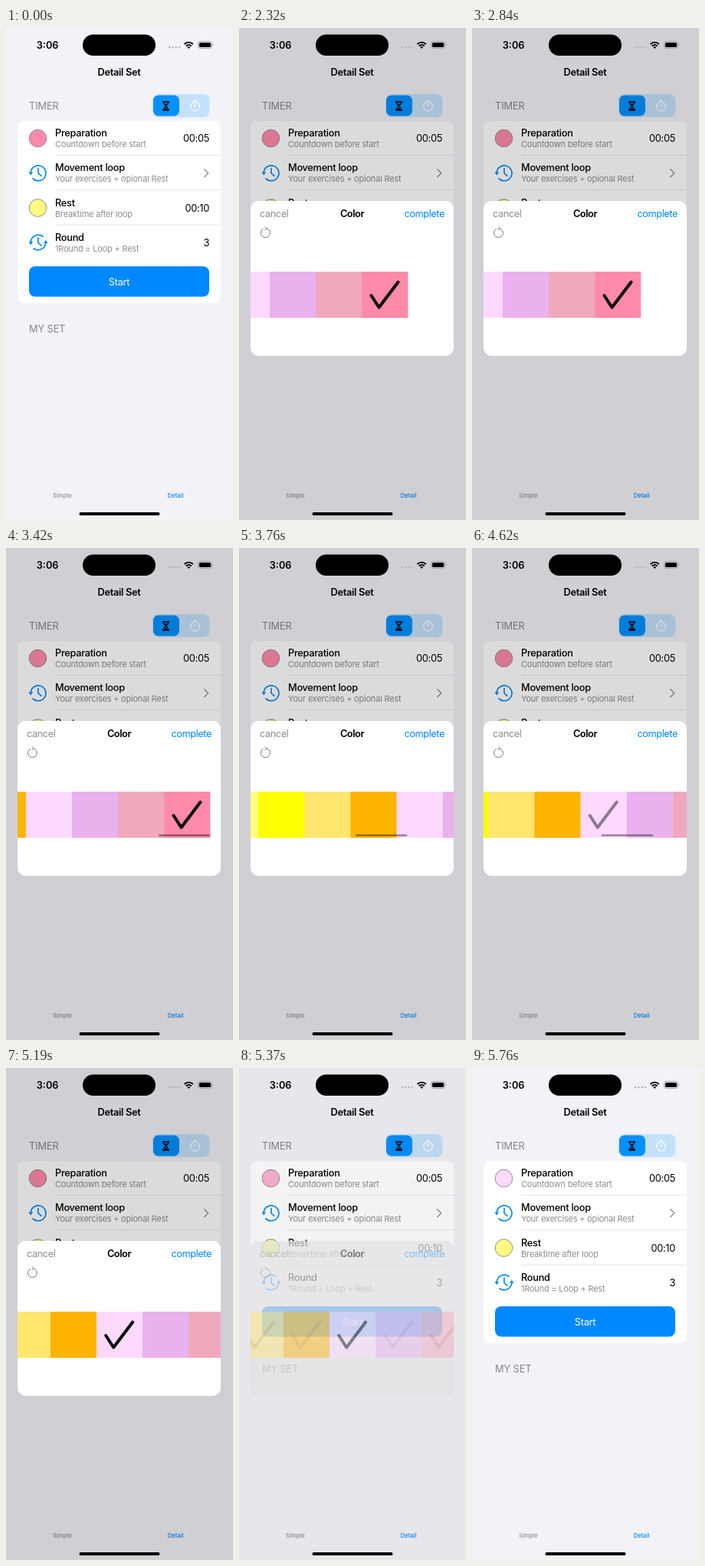
An HTML page that plays this animation: 296 px wide and 640 px high, repeating every 5850 ms.

```html
<!DOCTYPE html>
<html lang="en">
<head>
<meta charset="utf-8">
<title>Detail Set</title>
<style>
  html, body { margin: 0; width: 100%; height: 100%; overflow: hidden; background: #f2f2f7; }
  svg { display: block; width: 296px; height: 640px; }
  text { font: 400 12.8px Inter, Roboto, sans-serif; letter-spacing: -.3px; }
  .name { font-weight: 500; }
  .bold { font-weight: 600; }
  .sub { font-size: 11px; letter-spacing: -.21px; fill: #8e8e93; }
  .head { letter-spacing: -.1px; fill: #85858a; }
  .tab { font-size: 7.6px; font-weight: 500; letter-spacing: 0; }
  .wide { letter-spacing: 0; }
  .tight { letter-spacing: -.45px; }
  .end { text-anchor: end; }
  .mid { text-anchor: middle; }
  .line { fill: none; stroke-linecap: round; stroke-linejoin: round; }
  .blue { stroke: #0a8cf0; stroke-width: 1.7; }
</style>
</head>
<body>
<svg viewBox="0 0 296 640">
  <defs>
    <clipPath id="window"><rect x="15" y="317" width="265" height="60"/></clipPath>
    <path id="tip" d="M-2.8 0h5.6l-2.8 4.2z" fill="#0a8cf0"/>
  </defs>
  <rect width="296" height="640" fill="#f2f2f7"/>

  <!-- toggle -->
  <text class="head" x="30" y="105.7">TIMER</text>
  <rect x="191" y="86" width="74.5" height="30" rx="8" fill="#c5e1fa"/>
  <rect x="192" y="87.5" width="34" height="27" rx="7" fill="#0091ff"/>
  <path d="M204.5 96h8l-3.5 5.5 3.5 5.5h-8l3.5-5.5z" class="line" stroke="#000" stroke-width="1.3"/>
  <path d="M206 106.500l2.500-3 2.500 3zM207 98.500h3l-1.500 2z"/>
  <g class="line" stroke="#fff" stroke-width="1.2">
    <circle cx="246.5" cy="102" r="5.8"/>
    <path d="M246.5 98.5v3.500M245 94.500h3"/>
  </g>

  <!-- settings card -->
  <rect x="15" y="121" width="265" height="237" rx="8" fill="#fff"/>
  <g id="rows"></g>
  <circle id="dot" cx="41.5" cy="143.5" r="11.3" stroke="#8e8e93"/>
  <circle cx="41.5" cy="234" r="11.3" fill="#fffd80" stroke="#8e8e93"/>
  <g class="line blue">
    <path d="M32.2 188A9.9 9.9 0 1 1 35 195.8M42 182.500v6.300l4 3.600"/>
    <path d="M32.2 278.5A9.9 9.9 0 0 1 48 271.200M51.800 279.500A9.900 9.900 0 0 1 36 286.800M42 273v6.300l4 3.600"/>
  </g>
  <use href="#tip" x="32.3" y="187.5"/>
  <use href="#tip" x="32.3" y="278"/>
  <use href="#tip" transform="translate(51.8 280) scale(1 -1)"/>
  <path d="M258.7 183.7l5 5-5 5" class="line" stroke="#8e8e93" stroke-width="1.3"/>
  <rect x="30" y="310" width="235" height="39.5" rx="8" fill="#0088ff"/>
  <text class="mid" x="147.5" y="334.5" fill="#fff">Start</text>
  <text class="head" x="30" y="396.3">MY SET</text>

  <text class="tab" x="61" y="611" fill="#8e8e93">Simple</text>
  <text class="tab" x="210.8" y="611" fill="#0088ff">Detail</text>

  <rect id="dim" width="296" height="640"/>

  <!-- status bar and title -->
  <text class="bold wide" x="39.7" y="26.6">3:06</text>
  <rect x="100" y="8.5" width="95" height="27.5" rx="13.75"/>
  <path d="M213 25h14" class="line" stroke="#b4b4ba" stroke-width="2.6" stroke-dasharray="0 4.3"/>
  <path d="M232.5 21a8 8 0 0 1 11.4 0M234.7 23.5a5 5 0 0 1 7 0" fill="none" stroke="#000" stroke-width="1.9"/>
  <path d="M238.2 27l-2-2.2a3 3 0 0 1 4 0z"/>
  <rect x="250.5" y="17.5" width="18" height="9" rx="2.8" fill="none" stroke="#9a9aa0" stroke-width=".9"/>
  <rect x="251.9" y="18.9" width="15.2" height="6.2" rx="1.7"/>
  <path d="M269.6 20.5a1.6 1.6 0 0 1 0 3z" fill="#9a9aa0"/>
  <text class="bold mid" x="147.5" y="61.5">Detail Set</text>
  <rect x="95.5" y="630" width="105" height="4" rx="2"/>

  <!-- colour picker -->
  <rect id="panel" x="15" y="225" width="265" height="201.5" rx="11"/>
  <g id="picker">
    <text class="tight" x="27" y="245.8" fill="#8e8e93">cancel</text>
    <text class="bold mid tight" x="147.5" y="245.8">Color</text>
    <text class="end tight" x="268" y="245.8" fill="#0088ff">complete</text>
    <path d="M31.5 261.3A6 6 0 1 0 35.5 260.6M34 258.8l2 1.8-2 2" class="line" stroke="#77777c"/>
    <g clip-path="url(#window)"><g id="strip"></g></g>
    <rect id="bar" y="372.5" width="67.5" height="2.5" rx="1.25"/>
  </g>
</svg>
<script>
const $ = id => document.getElementById(id);
const NS = 'http://www.w3.org/2000/svg';
const LOOP = 5850, CELL = 60.1, OPEN = 2320;

function add(parent, tag, attrs, text = '') {
  const el = document.createElementNS(NS, tag);
  for (const key in attrs) el.setAttribute(key, attrs[key]);
  el.textContent = text;
  parent.appendChild(el);
  return el;
}

[
  ['Preparation', 'Countdown before start', '00:05'],
  ['Movement loop', 'Your exercises + opional Rest', ''],
  ['Rest', 'Breaktime after loop', '00:10'],
  ['Round', '1Round = Loop + Rest', '3']
].forEach(([name, sub, value], i) => {
  const y = 141 + i * 45.3;
  add($('rows'), 'text', { class: 'name', x: 64, y }, name);
  add($('rows'), 'text', { class: 'sub', x: 64, y: y + 14 }, sub);
  add($('rows'), 'text', { class: 'end', x: 265, y: y + 7 }, value);
  if (i) add($('rows'), 'rect', { x: 64, y: y - 21.2, width: 216, height: .8, fill: '#e2e2e6' });
});

// Right to left, starting with the last cell
const colors = ['#ff8aaa', '#f0a8bc', '#e9b2ee', '#fdd9ff', '#ffb400', '#ffe66e', '#ffff00', '#ffff80'];
const tints = ['#000', '#c0405c', '#b070c0', '#000', '#b07000', '#b08800', '#000', '#000'];
const checks = colors.map((fill, i) => {
  const x = -i * CELL;
  add($('strip'), 'rect', { x, y: 317, width: CELL + .2, height: 60, fill });
  return add($('strip'), 'path', {
    d: `M${x + 12.5} 348l10 15.5 25-33`, class: 'line', stroke: tints[i], 'stroke-width': 4
  });
});

// Moments at which the picture moves on
const run = (from, to, n) => Array.from({ length: n }, (_, i) => from + (to - from) * i / (n - 1));
const moments = [0, OPEN, ...run(3420, 3760, 4), ...run(4310, 4840, 6), 4940, 5050, 5190, 5370, ...run(5520, 5760, 3)];

const tracks = {
  x: [[3320, 160], [3420, 206], [3640, 350], [3760, 385.5], [4250, 385.5], [4420, 346], [4620, 298]],
  check: [[4270, 0], [4840, 1]],
  bar: [[3320, 0], [3420, .4], [4840, .4], [5190, 0]],
  show: [[5190, 1], [5370, .72], [5520, .28], [5760, 0]],
  mix: [[5190, 0], [5370, .5], [5520, 1]]
};

function at(track, t) {
  const i = track.findIndex(p => p[0] > t);
  if (i < 0) return track.at(-1)[1];
  if (i === 0) return track[0][1];
  const [t0, a] = track[i - 1], [t1, b] = track[i];
  return a + (b - a) * (t - t0) / (t1 - t0);
}

const mixed = (a, b, k) => `rgb(${a.map((v, i) => Math.round(v + (b[i] - v) * k))})`;
const fade = (el, value) => el.setAttribute('opacity', value);

function draw(now) {
  const t = moments.findLast(m => m <= now % LOOP);
  const x = at(tracks.x, t);
  const show = t < OPEN ? 0 : at(tracks.show, t);
  const closing = show < 1;
  $('strip').setAttribute('transform', `translate(${x} 0)`);
  $('bar').setAttribute('x', 199 - (x - 206) * .263);
  $('panel').setAttribute('fill', closing ? '#e4e4e6' : '#fff');
  $('dot').setAttribute('fill', mixed([255, 138, 170], [253, 217, 255], at(tracks.mix, t)));
  checks.forEach((el, i) => fade(el, i === 0 ? 1 : i === 3 ? at(tracks.check, t) : closing ? .4 : 0));
  fade($('bar'), at(tracks.bar, t));
  fade($('dim'), .14 * show ** 3.4);
  fade($('panel'), show);
  fade($('picker'), closing ? show * .62 : 1);
}

const start = performance.now();
function tick() {
  draw(performance.now() - start);
  requestAnimationFrame(tick);
}
tick();
</script>
</body>
</html>
```
